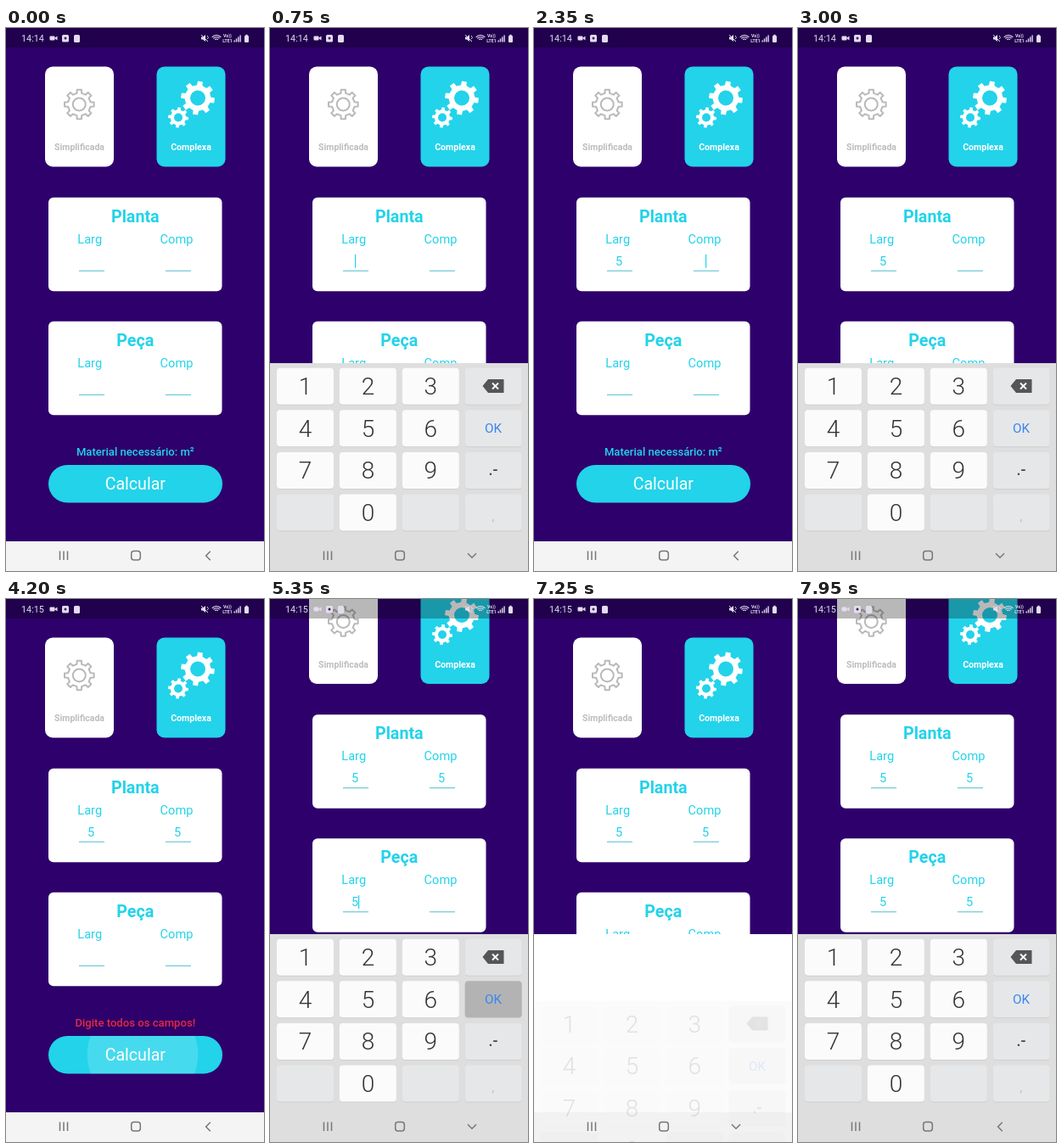
Recreate the animation shown at these times as an HTML page with a canvas. Size 304 px wide and 640 px high, loop 8 s.

```html
<!DOCTYPE html>
<html lang="pt">
<head>
<meta charset="utf-8">
<title>Calculadora de material</title>
<style>
html, body { margin: 0; width: 100%; height: 100%; overflow: hidden; background: #2e006c; }
canvas { display: block; width: 304px; height: 640px; }
</style>
</head>
<body>
<canvas id="stage"></canvas>
<script>
const W = 304, H = 640, LOOP = 8000;
const CYAN = '#22d3ea', PURPLE = '#2e006c', FONT = 'Roboto, "Noto Sans", sans-serif';
const KEYS_TOP = 395, NAV_TOP = 605, PAN = 63.5;

const canvas = document.getElementById('stage');
const ratio = window.devicePixelRatio || 1;
canvas.width = W * ratio;
canvas.height = H * ratio;
const c = canvas.getContext('2d');

// Each visit to a field: keyboard opens, digit typed, OK pressed, keyboard closes.
const visits = [
  { open: 500, type: 1150, ok: [1570, 1850], close: 1650, pan: 0 },
  { open: 2450, type: 3200, ok: [3600, 3780], close: 3700, pan: 0 },
  { open: 4550, type: 5050, ok: [5300, 5500], close: 5450, pan: PAN },
  { open: 7200, type: 7650, ok: [7800, 7930], close: 7950, pan: PAN }
];
const submits = [4050, 6350];
const FADE = 250;

const clamp = v => Math.min(1, Math.max(0, v));
const ease = v => { v = clamp(v); return v * v * (3 - 2 * v); };
const within = (t, a, b) => t >= a && t < b;

function box(x, y, w, h, r, fill) {
  c.beginPath();
  c.roundRect(x, y, w, h, r);
  c.fillStyle = fill;
  c.fill();
}

function label(str, x, y, size, fill, weight = 400, align = 'center') {
  c.font = `${weight} ${size}px ${FONT}`;
  c.textAlign = align;
  c.fillStyle = fill;
  c.fillText(str, x, y);
}

function line(points, stroke, width) {
  c.beginPath();
  points.forEach(([x, y], i) => i ? c.lineTo(x, y) : c.moveTo(x, y));
  c.strokeStyle = stroke;
  c.lineWidth = width;
  c.stroke();
}

function gearPath(x, y, r, teeth, turn) {
  const step = Math.PI * 2 / teeth, inner = r * 0.77;
  c.beginPath();
  for (let i = 0; i < teeth; i++) {
    const a = i * step + turn;
    [[-0.27, inner], [-0.19, r], [0.19, r], [0.27, inner]].forEach(([k, rad]) =>
      c.lineTo(x + rad * Math.cos(a + k * step), y + rad * Math.sin(a + k * step)));
  }
  c.closePath();
}

function solidGear(x, y, r, hole, turn) {
  gearPath(x, y, r, 8, turn);
  c.fillStyle = '#fff';
  c.fill();
  c.beginPath();
  c.arc(x, y, hole, 0, 7);
  c.fillStyle = CYAN;
  c.fill();
}

function drawModes() {
  box(46, 45.5, 81, 118, 9, '#fff');
  c.strokeStyle = '#b9b9b9';
  c.lineWidth = 2;
  c.lineJoin = 'round';
  gearPath(86.3, 90, 17.5, 8, 0);
  c.stroke();
  c.beginPath();
  c.arc(86.3, 90, 7.5, 0, 7);
  c.stroke();
  label('Simplificada', 86.5, 144, 10.5, '#bdbdbd', 700);

  box(177.5, 45.5, 81, 118, 9, CYAN);
  solidGear(226, 82.5, 20, 9, 0.15);
  solidGear(203, 105.5, 12, 5, 0.1);
  label('Complexa', 218, 144, 10.6, '#fff', 700);
}

function drawField(i, y, t) {
  const x = i % 2 ? 202 : 100, v = visits[i];
  const typed = t >= v.type;
  if (typed) label('5', x, y + 80, 14.6, CYAN);
  line([[x + (i % 2 ? -14 : -14), y + 86.5], [x + 16, y + 86.5]], '#4fbccd', 1);
  const since = t - (typed ? v.type : v.open - 100);
  if (within(t, v.open - 100, v.close) && since % 1000 < 500)
    box(x + (typed ? 4 : 0), y + 67, 1.2, 16, 0, CYAN);
}

function drawCard(title, y, first, t) {
  box(50, y, 204.5, 110.5, 6, '#fff');
  label(title, 152.3, y + 29, 19.7, CYAN, 700);
  label('Larg', 98.7, y + 54, 14.6, CYAN);
  label('Comp', 201, y + 54, 14.6, CYAN);
  drawField(first, y, t);
  drawField(first + 1, y, t);
}

function drawButton(t) {
  const failed = t >= submits[0] + 80;
  label(failed ? 'Digite todos os campos!' : 'Material necessário: m²',
    152.3, 504, 13.1, failed ? '#e62a3c' : CYAN, 500);
  c.save();
  box(50, 515, 205, 44.5, 22.25, CYAN);
  c.clip();
  for (const s of submits) {
    const d = t - s;
    if (!within(d, 0, 400)) continue;
    c.beginPath();
    c.arc(161, 537, 20 + d * 0.3, 0, 7);
    c.fillStyle = `rgba(255,255,255,${0.16 * clamp((400 - d) / 200)})`;
    c.fill();
  }
  c.restore();
  label('Calcular', 152.3, 544, 19.6, '#fff');
}

function panAt(t) {
  return visits.reduce((sum, v) =>
    sum + v.pan * (ease((t - v.open - 150) / 200) - ease((t - v.close) / 200)), 0);
}

function drawPage(t) {
  c.fillStyle = PURPLE;
  c.fillRect(0, 0, W, H);
  c.save();
  c.translate(0, -panAt(t));
  drawModes();
  drawCard('Planta', 199.7, 0, t);
  drawCard('Peça', 345.8, 2, t);
  drawButton(t);
  c.restore();
}

function drawStatus(t) {
  c.fillStyle = 'rgba(0,0,0,.28)';
  c.fillRect(0, 0, W, 23);
  const ink = '#e4dcee';
  label(t < 3300 ? '14:14' : '14:15', 18, 16, 10.8, ink, 400, 'left');
  box(51.5, 9.5, 6, 5, 1, ink);
  c.beginPath();
  c.moveTo(57, 12);
  c.lineTo(60.5, 9.5);
  c.lineTo(60.5, 14.5);
  c.fill();
  box(66, 8, 8, 8.5, 1.5, ink);
  box(68.5, 10.5, 3, 3, 1.5, '#3a2060');
  box(80, 8, 7, 9, 1.5, ink);

  // Muted speaker
  c.fillStyle = ink;
  c.beginPath();
  c.moveTo(230, 10.5);
  c.lineTo(232, 10.5);
  c.lineTo(235, 8);
  c.lineTo(235, 16);
  c.lineTo(232, 13.5);
  c.lineTo(230, 13.5);
  c.fill();
  line([[230, 8], [238, 16]], ink, 1);
  line([[237, 9], [238.5, 11.5], [237, 13]], ink, 0.9);

  for (const r of [2.5, 4.8, 7]) {
    c.beginPath();
    c.arc(248, 15.5, r, -Math.PI * 0.77, -Math.PI * 0.23);
    c.lineWidth = 1.1;
    c.stroke();
  }
  label('Vo))', 261, 11, 5.2, ink, 700);
  label('LTE1', 261, 16.5, 5.2, ink, 700);
  for (let i = 0; i < 4; i++) box(268.5 + i * 2.3, 14.5 - i * 2, 1.4, 2 + i * 2, 0, ink);
  box(281, 9, 5, 8, 1, ink);
  box(282.3, 7.8, 2.4, 1.5, 0, ink);
}

// Keyboard slide and opacity, or null when it is hidden.
function keyboardAt(t) {
  const v = visits.find(v => within(t, v.open, v.close + FADE));
  if (!v) return null;
  if (t >= v.close) {
    const p = (t - v.close) / FADE;
    return { v, drop: 120 * p * p, alpha: clamp(1 - 1.25 * p), closing: true };
  }
  const q = clamp((t - v.open) / FADE);
  return { v, drop: 124 * (1 - q) ** 2, alpha: q ** 1.3, closing: false };
}

function drawBackspace() {
  c.beginPath();
  [[250.5, 422], [257, 414], [275.5, 414], [275.5, 430], [257, 430]].forEach(p => c.lineTo(...p));
  c.fillStyle = '#555';
  c.fill();
  line([[262, 418.5], [269, 425.5]], '#fff', 1.8);
  line([[269, 418.5], [262, 425.5]], '#fff', 1.8);
}

function drawKeyboard(kb, t) {
  const { v } = kb;
  c.fillStyle = '#fff';
  c.fillRect(0, KEYS_TOP, W, H - KEYS_TOP);
  c.fillStyle = `rgba(244,244,244,${1 - kb.alpha})`;
  c.fillRect(0, NAV_TOP, W, H - NAV_TOP);

  c.save();
  c.beginPath();
  c.rect(0, KEYS_TOP, W, H - KEYS_TOP);
  c.clip();
  c.globalAlpha = kb.alpha;
  c.translate(0, kb.drop);
  c.fillStyle = '#dedede';
  c.fillRect(0, KEYS_TOP, W, H - KEYS_TOP);

  const okDown = within(t, ...v.ok), fiveDown = within(t, v.type - 80, v.type + 40);
  const rows = ['123<', '456K', '789.', ' 0 ,'];
  rows.forEach((row, r) => [...row].forEach((key, k) => {
    const x = 8 + k * 73.9, y = 400.7 + r * 49.6, digit = key >= '0' && key <= '9';
    let fill = digit ? '#fbfbfb' : '#e6e7e8';
    if (key === 'K' && okDown) fill = '#b3b3b3';
    if (key === '5' && fiveDown) fill = '#c4c4c4';
    box(x, y + 1, 67, 43, 4, 'rgba(0,0,0,.07)');
    box(x, y, 67, 43, 4, fill);
    if (digit) label(key, x + 33.5, y + 31.3, 28, '#333', 300);
  }));
  drawBackspace();
  label('OK', 263, 477, 15.3, '#3a86f0');
  label('.-', 263, 527, 18, '#444', 500);
  label(',', 263, 581, 14, '#b8bcc2');
  c.restore();
}

function drawNav(kb) {
  if (!kb) {
    c.fillStyle = '#f4f4f4';
    c.fillRect(0, NAV_TOP, W, H - NAV_TOP);
  }
  const ink = '#777';
  for (const x of [63.5, 68, 72.5]) line([[x, 616.5], [x, 627]], ink, 1.5);
  c.beginPath();
  c.roundRect(147.7, 616.5, 10.6, 10.6, 3);
  c.lineWidth = 1.5;
  c.stroke();
  const down = kb && !kb.closing;
  line(down ? [[233, 619.3], [238, 624.3], [243, 619.3]]
            : [[240.8, 616.8], [235.6, 622], [240.8, 627.2]], ink, 1.5);
}

function draw(t) {
  c.setTransform(ratio, 0, 0, ratio, 0, 0);
  const kb = keyboardAt(t);
  drawPage(t);
  drawStatus(t);
  if (kb) drawKeyboard(kb, t);
  drawNav(kb);
}

const start = performance.now();
function tick() {
  draw((performance.now() - start) % LOOP);
  requestAnimationFrame(tick);
}
tick();
</script>
</body>
</html>
```
